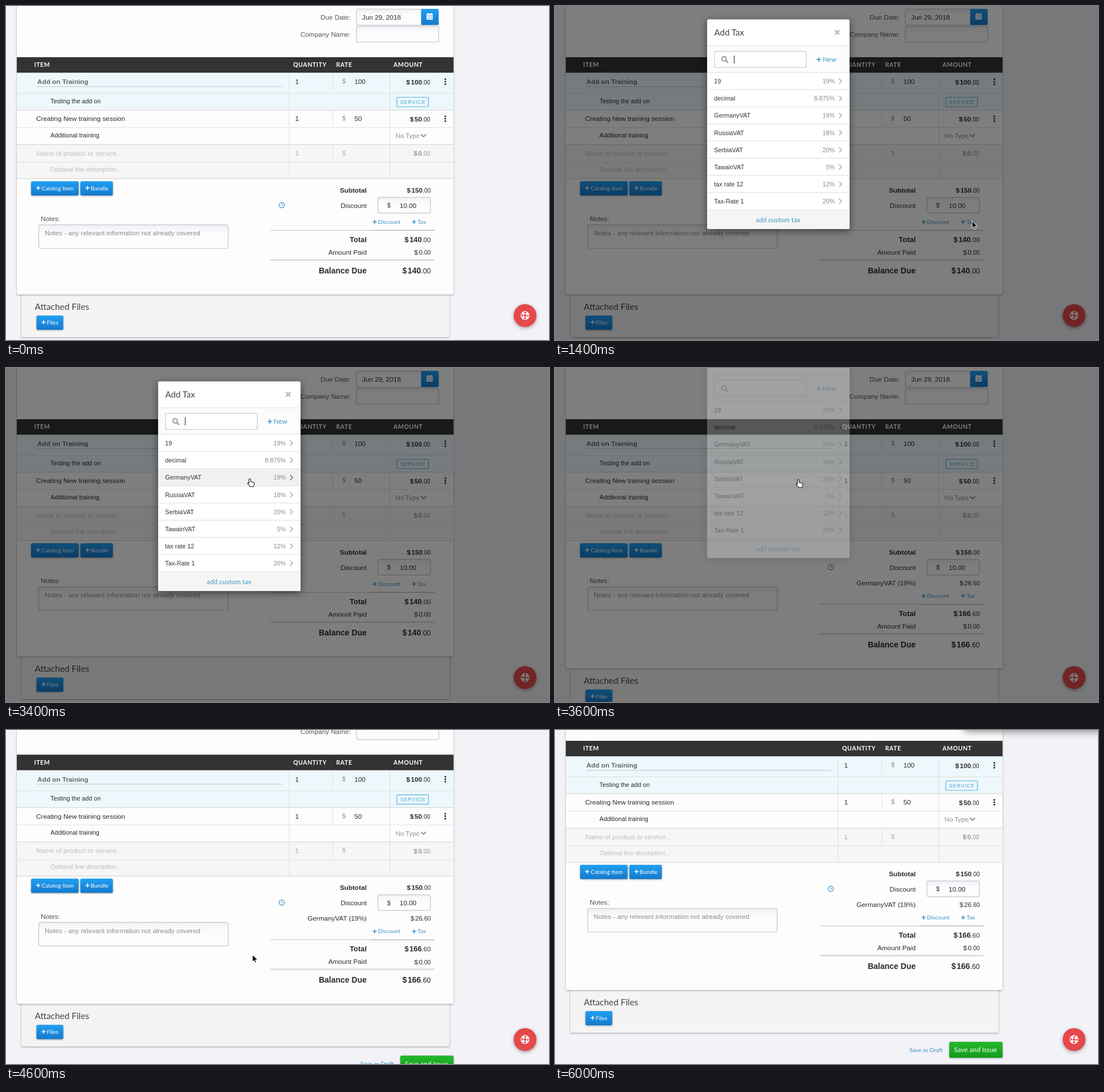
Animation, 953 px wide and 587 px high, one loop 6200 ms. Source, as an HTML page:

```html
<!DOCTYPE html>
<html lang="en">
<head>
<meta charset="utf-8">
<title>Adding a tax to an invoice</title>
<style>
html, body { margin: 0; width: 100%; height: 100%; overflow: hidden; background: #f2f2f7; }
svg { display: block; }
text { font-family: "Liberation Sans", Arial, sans-serif; white-space: pre; }
.lato { font-family: Lato, sans-serif; }
.card { filter: drop-shadow(0 1px 1.5px rgba(0,0,0,.35)); }
.lift { filter: drop-shadow(0 2px 3px rgba(0,0,0,.35)); }
.float { filter: drop-shadow(0 3px 7px rgba(0,0,0,.5)); }
</style>
</head>
<body>
<svg id="stage" width="953" height="587" viewBox="0 0 953 587">
  <defs>
    <linearGradient id="blue" x2="0" y2="1"><stop stop-color="#20a0f2"/><stop offset="1" stop-color="#1579cc"/></linearGradient>
    <linearGradient id="green" x2="0" y2="1"><stop stop-color="#23b92c"/><stop offset="1" stop-color="#159a1d"/></linearGradient>
    <linearGradient id="field" x2="0" y2="1"><stop stop-color="#f0f0f5"/><stop offset=".35" stop-color="#fcfcfe"/><stop offset="1" stop-color="#fdfdfe"/></linearGradient>
  </defs>
</svg>
<script>
const LOOP = 6200, STEP = 200;
const DARK = '#2b2b2d', MID = '#555', PALE = '#bdbdbd', LINK = '#3f93c6';
const stage = document.getElementById('stage');

function el(parent, tag, attrs = {}) {
  const node = document.createElementNS('http://www.w3.org/2000/svg', tag);
  for (const key in attrs) node.setAttribute(key, attrs[key]);
  return parent.appendChild(node);
}
const group = (parent, attrs) => el(parent, 'g', attrs);
const rect = (p, x, y, width, height, fill, more) => el(p, 'rect', { x, y, width, height, fill, ...more });
const path = (p, d, stroke, width = 1, more) =>
  el(p, 'path', { d, stroke, 'stroke-width': width, fill: 'none', ...more });

// y is the middle of the capital letters
function text(p, x, y, str, size = 11.75, fill = DARK, more = {}) {
  const node = el(p, 'text', { x, y: y + size * .36, 'font-size': size, fill, ...more });
  node.textContent = str;
  return node;
}
const END = { 'text-anchor': 'end' }, CENTER = { 'text-anchor': 'middle' };
const BOLD = { 'font-weight': 700 }, LATO = { class: 'lato' };

function money(p, x, y, whole, cents, size = 11.75, fill = DARK, bold = true) {
  const node = text(p, x, y, '', size, fill, END);
  const weight = bold ? 700 : 400;
  el(node, 'tspan', { 'font-weight': weight }).textContent = '$';
  el(node, 'tspan', { 'font-weight': weight, dx: 1.5 }).textContent = whole;
  el(node, 'tspan', { 'font-size': size * .885 }).textContent = '.' + cents;
}
const plus = (p, x, y, color, r = 3.6) =>
  path(p, `M${x - r} ${y}h${2 * r}M${x} ${y - r}v${2 * r}`, color, 1.5);
const field = (p, x, y, w, h) => rect(p, x, y, w, h, 'url(#field)', { rx: 3, stroke: '#c6c6cc', 'stroke-width': 1.2 });

function button(p, x, y, w, label, textX) {
  rect(p, x, y, w, 25, 'url(#blue)', { rx: 2.5, class: 'card' });
  plus(p, x + 12.5, y + 11.8, '#fff');
  text(p, textX, y + 12, label, 10.2, '#fff', LATO);
}
function link(p, x, y, label, size = 10.1) {
  plus(p, x, y, LINK, size * .36);
  text(p, x + size * .58, y, label, size, LINK, LATO);
}

const page = group(stage);

// Attached files and save buttons, below the invoice sheet
const below = group(page);
rect(below, 27, 470, 751.5, 112, '#f4f4f4', { rx: 2, class: 'card' });
text(below, 50.5, 528, 'Attached Files', 15.4, '#444', LATO);
button(below, 53.5, 544, 47, 'Files', 71.5);
text(below, 622, 612, 'Save as Draft', 10.2, LINK, LATO);
rect(below, 692, 598, 93.5, 28, 'url(#green)', { rx: 2.5, class: 'card' });
text(below, 738, 612, 'Save and Issue', 11.8, '#fff', { ...LATO, ...CENTER });

const sheet = rect(page, 19, -40, 766.5, 547, '#fdfdfd', { rx: 2, class: 'card' });

// Top fields
text(page, 605, 19.5, 'Due Date:', 11.75, MID, END);
field(page, 615, 5.5, 130, 28);
text(page, 625, 19.5, 'Jun 29, 2018');
rect(page, 728.5, 5, 31, 28.5, 'url(#blue)', { rx: 2.5 });
rect(page, 738, 13.5, 11, 10.5, '#fff', { rx: 1 });
path(page, 'M740.5 12v3M746.5 12v3', '#fff', 1.6);
path(page, 'M738.5 16.5h10M740 19h8M740 21.5h8', '#2a8fdd', .9, { 'stroke-dasharray': '1.6 .5' });
text(page, 605, 49.5, 'Company Name:', 11.75, MID, END);
field(page, 615, 35.7, 144.5, 27.8);

// Item table
rect(page, 19, 90, 766.5, 27.5, '#333');
[[49.5, 'ITEM'], [504, 'QUANTITY'], [579.5, 'RATE'], [680, 'AMOUNT']].forEach(([x, label]) =>
  text(page, x, 103.5, label, 10.5, '#fff', { ...LATO, ...BOLD, 'letter-spacing': .6 }));
rect(page, 19, 117.5, 766.5, 65.5, '#edf7fc');
rect(page, 19, 243, 766.5, 60.5, '#f6f6f6');
path(page, 'M19 153.5h766.5M19 213.5h766.5M19 274.5h766.5', '#dde1e3');
path(page, 'M19 183h766.5M19 243.5h766.5M19 303.5h766.5', '#cfd1d2');
path(page, 'M497 118v185M673.5 118v185', '#dcdfe1');
path(page, 'M573.5 118v30M573.5 184v27M573.5 244v28', '#dcdfe1');

text(page, 55, 133, 'Add on Training', 11.75, '#666', BOLD);
path(page, 'M55 141.8h429', '#8f9598', 1, { 'stroke-dasharray': '1 1' });
text(page, 78, 167, 'Testing the add on', 10.8);
text(page, 53, 198, 'Creating New training session');
text(page, 78, 227, 'Additional training', 10.8);
text(page, 53, 258.5, 'Name of product or service...', 11.75, PALE);
text(page, 78, 287, 'Optional line description...', 10.8, PALE);
[[133, '100'], [198, '50'], [258.5, '']].forEach(([y, rate], i) => {
  text(page, 507.5, y, '1', 11.75, i < 2 ? DARK : '#aaa');
  text(page, 590, y - .5, '$', 10.8, i < 2 ? '#888' : '#aaa');
  text(page, 611.5, y, rate);
  money(page, 744.5, y + .5, rate || '0', '00', 11.75, i < 2 ? DARK : '#999');
  if (i < 2) [-4.3, 0, 4.3].forEach(d => el(page, 'circle', { cx: 771, cy: y + d, r: 1.5, fill: '#222' }));
});
rect(page, 686, 160.5, 55.5, 16.5, 'none', { rx: 1, stroke: '#58b7dd', 'stroke-width': 1.2 });
text(page, 691.8, 169, 'SERVICE', 8.8, '#45acd6', { 'letter-spacing': .9 });
text(page, 683.5, 228, 'No Type', 11.6, '#8f8f8f', LATO);
path(page, 'M728.5 225.5l4.3 4.3 4.3-4.3', '#888', 1.8);
const handle = path(page, 'M26 193h17M26 196.5h17M26 200h17', '#b5b5b5', 1.2);

// Lower left
button(page, 44, 308, 83.5, 'Catalog Item', 62.5);
button(page, 130.5, 308, 57, 'Bundle', 148.5);
text(page, 61, 374, 'Notes:', 11.75, MID);
field(page, 57.5, 384.7, 332.5, 41.3);
text(page, 68, 399, 'Notes - any relevant information not already covered', 11.75, '#8a8a8a');

// Totals
text(page, 633, 323.5, 'Subtotal', 11.75, DARK, { ...END, ...BOLD });
money(page, 745.5, 323.5, '150', '00');
el(page, 'circle', { cx: 484, cy: 350, r: 4.7, fill: 'none', stroke: LINK, 'stroke-width': 1.2 });
path(page, 'M484 347v3.2h2.4', LINK);
text(page, 633, 350.5, 'Discount', 11.75, DARK, END);
field(page, 652.7, 336.3, 92.3, 27.5);
text(page, 669, 350.5, '$', 10.8);
text(page, 691, 350.5, '10.00');
const taxLine = group(page);
text(taxLine, 633, 377.5, 'GermanyVAT (19%)', 11.75, DARK, END);
money(taxLine, 745.5, 377.5, '26', '60', 11.75, DARK, false);

const sums = group(page);
link(sums, 647, 379.5, 'Discount');
link(sums, 716.3, 379.5, 'Tax');
path(sums, 'M464 394.3h288', '#d0d0d0', 1.2);
path(sums, 'M640 394.3h112', '#b5b5b5', 1.2);
text(sums, 633, 410.5, 'Total', 12.9, DARK, { ...END, ...BOLD });
text(sums, 633, 432.5, 'Amount Paid', 11.75, DARK, END);
money(sums, 745.5, 433, '0', '00', 11.75, DARK, false);
path(sums, 'M464 446.5h288', '#dedede', 3);
text(sums, 633, 464.5, 'Balance Due', 14, DARK, { ...END, ...BOLD });
const [plain, taxed] = [['140', '00'], ['166', '60']].map(([whole, cents]) => {
  const g = group(sums);
  money(g, 745.5, 410.5, whole, cents, 12.9);
  money(g, 745.5, 464.5, whole, cents, 14);
  return g;
});

// Help button
const help = group(stage, { transform: 'translate(911 544)' });
el(help, 'circle', { r: 20, fill: '#e5484b', class: 'lift' });
[7, 3.1].forEach(r => el(help, 'circle', { r, fill: 'none', stroke: '#fff', 'stroke-width': 1.3 }));
el(help, 'circle', { r: 5.1, fill: 'none', stroke: '#fff', 'stroke-width': 4,
  'stroke-dasharray': '4 4.01', transform: 'rotate(22.5)' });

// Things peeking in from the edges
const sidePanel = rect(stage, 948.5, 234, 30, 267, '#fafafc', { rx: 4, stroke: '#d0d0d8' });
const topPanel = rect(stage, 718, -40, 300, 39, '#f4f4f6', { rx: 5, class: 'float' });

const shade = rect(stage, 0, 0, 953, 587, '#000', { opacity: .5 });

// Tax picker
const ROW_TOP = 117, ROW = 30.15;
const rates = [['19', '19%'], ['decimal', '8.875%'], ['GermanyVAT', '19%'], ['RussiaVAT', '18%'],
  ['SerbiaVAT', '20%'], ['TawainVAT', '5%'], ['tax rate 12', '12%'], ['Tax-Rate 1', '20%']];
const modal = group(stage);
rect(modal, 267, 23.5, 250, 368.5, '#fff', { rx: 3, class: 'float' });
text(modal, 279.5, 47, 'Add Tax', 15, '#444', LATO);
path(modal, 'M491.5 42.5l7.5 7.5m0-7.5l-7.5 7.5', '#b8b8b8', 2.5);
rect(modal, 267, 70, 250, 46.5, '#fcfcfc');
path(modal, 'M267 70h250', '#dedede');
rect(modal, 280, 79.5, 161, 28.5, '#fff', { rx: 3, stroke: '#c4c4c4', 'stroke-width': 1.1 });
el(modal, 'circle', { cx: 296.8, cy: 92.8, r: 3.9, fill: 'none', stroke: '#999', 'stroke-width': 2 });
path(modal, 'M299.7 95.8l4 4', '#999', 2.4);
const caret = path(modal, 'M314.5 87v14', '#222');
link(modal, 463, 94, 'New', 11.7);
const rows = rates.map(([name, rate], i) => {
  const y = ROW_TOP + i * ROW, mid = y + 15.2;
  const back = rect(modal, 267, y, 250, ROW, '#fff');
  path(modal, `M267 ${y - .3}h250`, '#dedede');
  text(modal, 279.3, mid, name, 10.8, '#333');
  text(modal, 491, mid, rate, 10.8, '#8a8a8a', END);
  const arrow = path(modal, `M498.5 ${mid - 4.6}l4.6 4.6-4.6 4.6`, '#aaa', 1.4);
  return { back, arrow };
});
rect(modal, 267, 358, 250, 34, '#f5f5f5', { rx: 3 });
path(modal, 'M267 358h250', '#e4e4e4');
text(modal, 391.5, 375.5, 'add custom tax', 11.7, LINK, { ...LATO, ...CENTER });

// Pointers, drawn with the hot spot at 0,0
const pointer = group(stage);
const shapes = {
  arrow: path(pointer, 'M0 0V12.5L3 9.8 5 14.2 7 13.3 5.1 9H9Z', '#fff', 1, { fill: '#000' }),
  hand: path(pointer, 'M-1.5 1.5Q-1.5 0 0 0T1.5 1.5V5.3L6 6.2Q8 6.8 7.8 9L7 13Q6.8 14 6 14H1L-3.5 9Q-4.3 7.4-3 7L-1.5 8Z', '#111', 1.1, { fill: '#fff' }),
  beam: path(pointer, 'M-3-6.5Q0-6.5 0-5Q0-6.5 3-6.5M0-5V5M-3 6.5Q0 6.5 0 5Q0 6.5 3 6.5M-1.5 1.5h3', '#111', 1.2)
};

// time, x, y, pointer shape from that time on
const moves = [
  [600, 575, 470, 'arrow'], [800, 650, 425, 'arrow'], [1000, 722, 384, 'hand'], [1200, 732, 378, 'hand'],
  [1400, 732, 378, 'arrow'], [1800, 725, 368, 'arrow'], [2200, 520, 190, 'arrow'], [2400, 460, 142, 'hand'],
  [2600, 451, 136, 'hand'], [2800, 448, 142, 'hand'], [3200, 429, 193, 'hand'], [3600, 427, 196, 'hand'],
  [3800, 427, 196, 'beam'], [4000, 427, 200, 'beam'], [4200, 430, 310, 'arrow'], [4400, 432.5, 395, 'arrow'],
  [5000, 432.5, 395, 'arrow'], [5600, 760, 10, 'arrow'], [5800, 780, -30, 'arrow']
];
const scrolls = [[4200, 0], [4800, 70], [5000, 71]];

// Linear lookup in a table of [time, ...values]
function sample(table, t, col) {
  const next = table.findIndex(k => k[0] > t);
  if (next < 0) return table[table.length - 1][col];
  if (next === 0) return table[0][col];
  const a = table[next - 1], b = table[next];
  return a[col] + (b[col] - a[col]) * (t - a[0]) / (b[0] - a[0]);
}
const show = (node, on) => node.setAttribute('visibility', on ? 'inherit' : 'hidden');
const shift = (node, x, y) => node.setAttribute('transform', `translate(${x} ${y})`);

function draw(t) {
  const open = t >= 1400 && t < 3800, closing = t >= 3600, hasTax = t >= 3600;
  const x = sample(moves, t, 1), y = sample(moves, t, 2);
  const key = moves.filter(k => k[0] <= t).pop();
  const kind = key && key[3];

  shift(page, 0, -sample(scrolls, t, 1));
  const push = hasTax ? 21 : 0;
  shift(sums, 0, push);
  shift(below, 0, push);
  sheet.setAttribute('height', 547 + push);
  show(taxLine, hasTax);
  show(plain, !hasTax);
  show(taxed, hasTax);
  show(handle, kind === 'beam');

  show(shade, open);
  show(modal, open);
  shift(modal, 0, closing ? -58 : 0);
  modal.setAttribute('opacity', closing ? .27 : 1);
  show(caret, !closing && (t - 1400) % 1000 < 500);
  const hover = open && !closing && kind === 'hand' ? Math.floor((y - ROW_TOP) / ROW) : -1;
  rows.forEach((row, i) => {
    row.back.setAttribute('fill', i === hover ? '#f1f1f1' : '#fff');
    row.arrow.setAttribute('stroke', i === hover ? '#666' : '#aaa');
  });

  show(sidePanel, t >= 4800 && t < 5000);
  show(topPanel, t >= 6000);
  shift(pointer, x, y);
  for (const name in shapes) show(shapes[name], name === kind);
}

const start = performance.now();
function tick() {
  const t = (performance.now() - start) % LOOP;
  draw(Math.floor(t / STEP) * STEP);
  requestAnimationFrame(tick);
}
tick();
</script>
</body>
</html>
```
